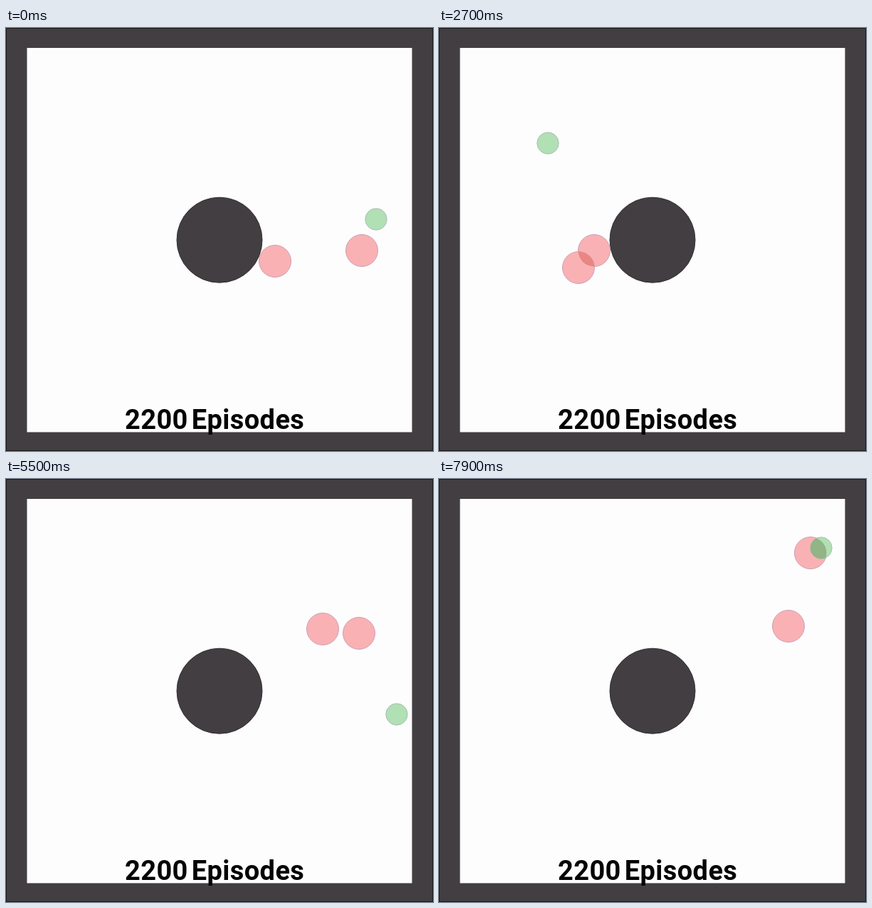
Animation of 600x595 px, one loop 8 s. Source, as an HTML page with a canvas:

```html
<!DOCTYPE html>
<html lang="en">
<head>
<meta charset="utf-8">
<title>Chase training</title>
<style>
  html, body { margin: 0; width: 100%; height: 100%; overflow: hidden; background: #423e41; }
  canvas, svg { position: absolute; left: 0; top: 0; width: 600px; height: 595px; }
  text {
    font: 700 38px Roboto, "Open Sans", sans-serif;
    letter-spacing: 0.4px; word-spacing: -5px; fill: #050405;
  }
</style>
</head>
<body>
<canvas id="arena" width="600" height="595"></canvas>
<svg viewBox="0 0 600 595"><text x="167" y="564">2200 Episodes</text></svg>
<script>
const LOOP = 8000, STEP = 100;
const DARK = '#423e41';
const ROCK = { x: 300, y: 298.2, r: 60, fill: DARK, line: '#333032' };
const CHASER = { r: 22.5, fill: '#f9b1b4', line: '#cba0b4', swing: 60 };
const RUNNER = { r: 15.2, fill: '#b0e0b4', line: '#acbcb5', swing: 120 };

// Times of the key poses, and how far all balls swing back in each leg (radians)
const TIMES = [0, 1100, 2700, 4400, 5500, 6800, 7900];
const SWEEP = [0, 0, 0, -1.4, 0, 0];

// Key poses: x, y and, where needed, extra laps beyond the shortest turn
const chaserA = {
  ...CHASER,
  poses: [[378, 328], [548, 341], [218, 313], [401, 467, 1], [445, 211], [51, 396], [522, 104]]
};
const chaserB = {
  ...CHASER,
  poses: [[500, 313], [527, 425], [196, 337], [417, 498], [496, 217], [78, 404], [491, 207, 1]]
};
const runner = {
  ...RUNNER,
  poses: [[520, 269], [500, 406, -1], [153, 162, 1], [441, 404], [549, 331], [67, 358], [537, 97]]
};
const balls = [chaserA, chaserB, runner];

const TURN = 2 * Math.PI;
const clamp = (v, lo, hi) => Math.min(hi, Math.max(lo, v));
const mix = (a, b, u) => a + (b - a) * u;
const polar = ([x, y]) => [Math.atan2(y - ROCK.y, x - ROCK.x), Math.hypot(x - ROCK.x, y - ROCK.y)];

// Circle the rock from pose to pose, swinging out but staying inside the walls
function place(ball, t) {
  const last = TIMES.length - 2;
  const leg = clamp(TIMES.findIndex(time => time > t) - 1, 0, last);
  const i = t >= TIMES[last + 1] ? last : leg;
  const u = Math.min(1, (t - TIMES[i]) / (TIMES[i + 1] - TIMES[i]));
  const [from, near] = polar(ball.poses[i]);
  const [to, far] = polar(ball.poses[i + 1]);
  const laps = ball.poses[i + 1][2] || 0;
  const turn = to - from - TURN * Math.round((to - from) / TURN) + TURN * laps;
  const arc = Math.sin(Math.PI * u);
  const angle = from + turn * u + SWEEP[i] * arc;
  const dist = Math.max(ROCK.r + ball.r, mix(near, far, u) + ball.swing * arc);
  ball.x = clamp(ROCK.x + dist * Math.cos(angle), 28.5 + ball.r, 571 - ball.r);
  ball.y = clamp(ROCK.y + dist * Math.sin(angle), 27 + ball.r, 570 - ball.r);
}

function trace({ x, y, r }) {
  ctx.beginPath();
  ctx.arc(x, y, r, 0, TURN);
}

function disc(ball) {
  trace(ball);
  ctx.fillStyle = ball.fill;
  ctx.strokeStyle = ball.line;
  ctx.fill();
  ctx.stroke();
}

function overlap(a, b, color) {
  ctx.save();
  trace(a);
  ctx.clip();
  trace(b);
  ctx.fillStyle = color;
  ctx.fill();
  ctx.restore();
}

const ctx = document.getElementById('arena').getContext('2d');

function draw(t) {
  ctx.fillStyle = DARK;
  ctx.fillRect(0, 0, 600, 595);
  ctx.strokeStyle = '#19171a';
  ctx.strokeRect(0.5, 0.5, 599, 594);
  ctx.fillStyle = '#fefdfe';
  ctx.fillRect(29.5, 28, 541, 540.5);
  disc(ROCK);
  balls.forEach(ball => place(ball, t));
  balls.forEach(disc);
  overlap(chaserA, chaserB, '#e98683');
  overlap(chaserA, runner, '#92b487');
  overlap(chaserB, runner, '#92b487');
}

const start = performance.now();
function tick() {
  const t = (performance.now() - start) % LOOP;
  draw(Math.floor(t / STEP) * STEP);
  requestAnimationFrame(tick);
}
tick();
</script>
</body>
</html>
```
